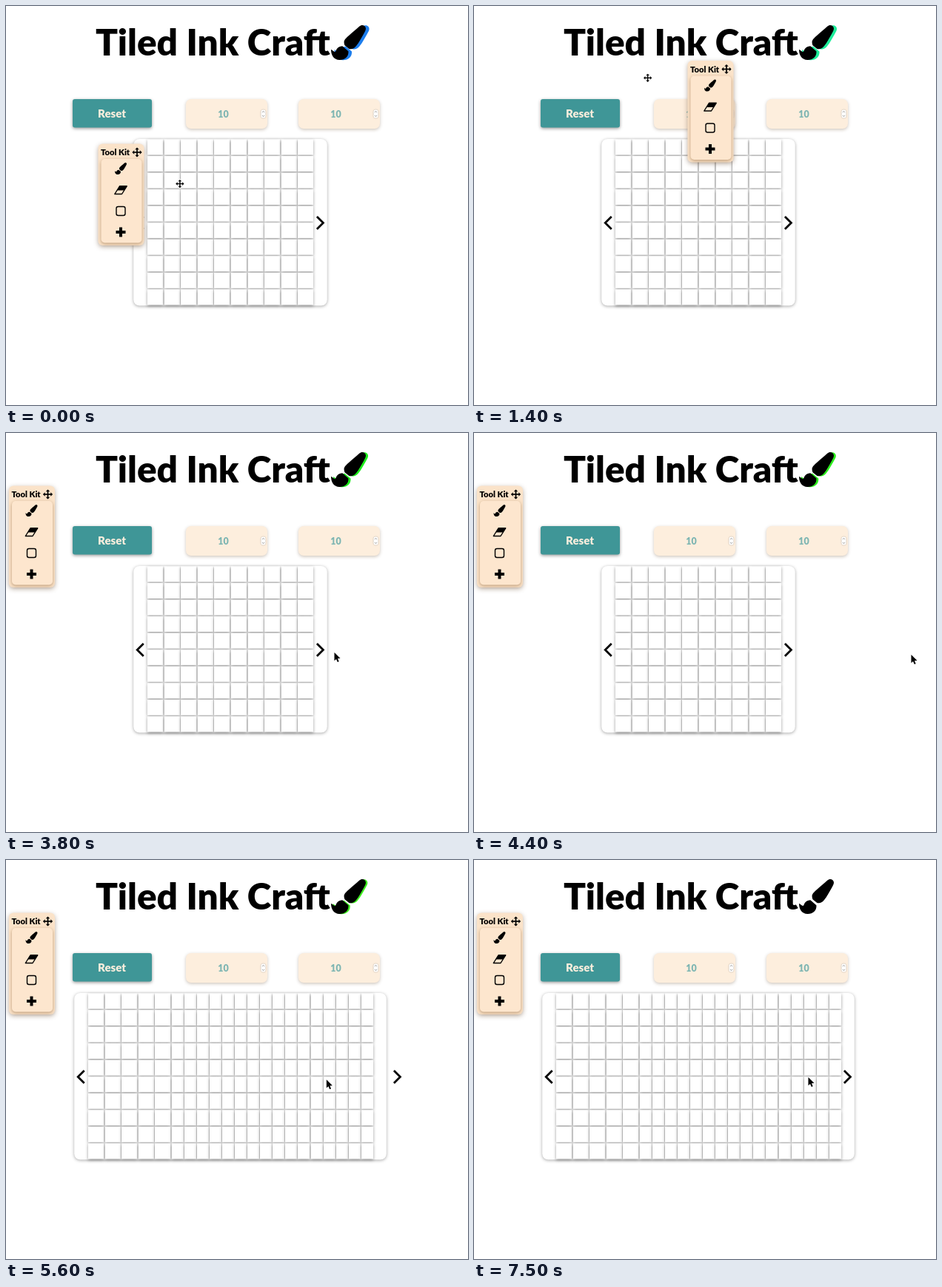
An HTML page with a canvas for the animation above (7.6 s loop, 624 px wide and 540 px high).

```html
<!DOCTYPE html>
<html lang="en">
<head>
<meta charset="utf-8">
<title>Tiled Ink Craft</title>
<style>
html, body { margin: 0; width: 100%; height: 100%; overflow: hidden; background: #fff; }
canvas { display: block; }
</style>
</head>
<body>
<canvas id="stage" width="624" height="540"></canvas>
<script>
const ctx = document.getElementById('stage').getContext('2d');
const LOOP = 7600, STEP = 100;
const GROW = 5000, SETTLE = 5500;
const FONT = 'Lato, "Open Sans", sans-serif';

// key points: time, x, y
const kitPath = [
  [0, 124, 186], [200, 266, 240], [800, 472, 160], [1050, 540, 98],
  [1400, 288, 73.5], [1700, 45, 98], [2000, 5, 142], [2300, 3.5, 71]
];
const pointerPath = [
  [2400, 36, 91], [3200, 430, 300], [3800, 443, 297], [4400, 590, 300],
  [5000, 422, 298], [6000, 438, 297], [6800, 440, 445], [7500, 451, 294]
];

const brush = new Path2D('M167 309c-40 3-77 18-97 73-2 6-8 10-15 10-11 0-45-28-55-35' +
  'C0 440 38 512 128 512c76 0 128-44 128-120 0-3-1-6-1-9zM458 0c-15 0-29 7-40 16' +
  'C213 199 192 203 192 257c0 14 3 27 9 39l64 53c7 2 14 3 22 3 62 0 98-45 211-256' +
  'C505 81 512 66 512 50 512 21 486 0 458 0z');

const clamp = v => Math.max(0, Math.min(1, v));

// Hermite curve through the keys; flow 0 rests at each key, 1 passes through
function glide(keys, t, flow) {
  const last = keys.length - 1;
  t = Math.max(keys[0][0], Math.min(keys[last][0], t));
  const i = Math.max(1, keys.findIndex(k => k[0] >= t));
  const span = keys[i][0] - keys[i - 1][0];
  const k = (t - keys[i - 1][0]) / span;
  const slope = (n, axis) => {
    const a = keys[Math.max(0, n - 1)], b = keys[Math.min(last, n + 1)];
    return flow * span * (b[axis] - a[axis]) / (b[0] - a[0]);
  };
  return [1, 2].map(axis => {
    const from = keys[i - 1][axis], to = keys[i][axis];
    return from + (to - from) * k * k * (3 - 2 * k) +
      slope(i - 1, axis) * k * (1 - k) ** 2 - slope(i, axis) * k * k * (1 - k);
  });
}

function box(x, y, w, h, r, fill, shadow, blur = 4, dy = 1.5) {
  ctx.save();
  ctx.shadowColor = shadow;
  ctx.shadowBlur = blur;
  ctx.shadowOffsetY = dy;
  ctx.fillStyle = fill;
  ctx.beginPath();
  ctx.roundRect(x, y, w, h, r);
  ctx.fill();
  ctx.restore();
}

function poly(points, close) {
  ctx.beginPath();
  points.forEach(([x, y]) => ctx.lineTo(x, y));
  if (close) ctx.closePath();
}

function label(str, x, y, size, color, align = 'center') {
  ctx.font = `900 ${size}px ${FONT}`;
  ctx.textAlign = align;
  ctx.fillStyle = color;
  ctx.fillText(str, x, y);
}

function drawBrush(x, y, size, color) {
  ctx.save();
  ctx.translate(x, y);
  ctx.scale(size / 512, size / 512);
  ctx.fillStyle = color;
  ctx.fill(brush);
  ctx.restore();
}

function drawTitle(t) {
  const str = 'Tiled Ink Craft';
  ctx.font = `900 48px ${FONT}`;
  const size = 48 * 317 / ctx.measureText(str).width;
  label(str, 121, 67, size, '#000', 'left');
  if (t < 5700) {
    const hue = 105 + 107 * Math.exp(-t / 1900);
    drawBrush(443.6 - t * 0.0004, 26.3, 47, `hsl(${hue}, 85%, 52%)`);
  }
  drawBrush(439, 26, 47, '#000');
}

function drawInput(x) {
  box(x, 126, 110, 40, 7, '#fdeedd', 'rgba(90,60,30,.3)');
  label('10', x + 50.5, 150.5, 12.5, '#7db5b2');
  box(x + 101.5, 140.5, 6, 11, 2.5, '#fff', 'rgba(0,0,0,.3)', 2, 0);
  ctx.strokeStyle = '#888';
  ctx.lineWidth = 0.8;
  for (const s of [-1, 1]) {
    const y = 146 + s * 2;
    poly([[x + 103, y], [x + 104.5, y + s * 1.6], [x + 106, y]]);
    ctx.stroke();
  }
}

function chevron(x, dir) {
  ctx.strokeStyle = '#000';
  ctx.lineWidth = 2.8;
  ctx.lineJoin = 'miter';
  poly([[x - dir * 4.5, 285], [x + dir * 4, 293.5], [x - dir * 4.5, 302]]);
  ctx.stroke();
}

// wide columns first, then narrow ones
function columns(t) {
  if (t < GROW) return [10, 0];
  if (t < SETTLE) return [10, 1 + Math.floor((t - GROW) / 40)];
  return [5, 16];
}

function drawGrid(t) {
  const [wide, slim] = columns(t);
  const pitch = 22.55, thin = 17.05;
  const inner = wide * pitch + slim * thin;
  const left = 303 - inner / 2, right = left + inner;
  box(left - 18, 180, inner + 36, 225.5, 8, '#fff', 'rgba(0,0,0,.35)', 4, 1);
  for (let c = 0; c < wide + slim; c++) {
    const x = Math.round(left + Math.min(c, wide) * pitch + Math.max(0, c - wide) * thin);
    const w = c < wide ? pitch : thin;
    for (let r = 0; r < 10; r++) {
      box(x + 1, 180.5 + r * pitch, Math.floor(w) - 1, 21, 0, '#fff', 'rgba(0,0,0,.4)', 4, 1.5);
    }
  }
  // the right arrow trails behind the changing width
  const lag = t < GROW ? 0 : t < SETTLE ? -2.5 : 27 * (1 - clamp((t - SETTLE) / 900));
  chevron(left - 9, -1);
  chevron(right + 8.7 + lag, 1);
}

function moveIcon(x, y, r, width) {
  const h = r * 0.42;
  ctx.lineWidth = width;
  for (const [dx, dy] of [[1, 0], [-1, 0], [0, 1], [0, -1]]) {
    poly([[x, y], [x + dx * (r - 1), y + dy * (r - 1)]]);
    ctx.stroke();
    const bx = x + dx * (r - h), by = y + dy * (r - h);
    poly([[x + dx * r, y + dy * r], [bx + dy * h, by + dx * h], [bx - dy * h, by - dx * h]], true);
    ctx.fill();
  }
}

function drawKit(x, y) {
  ctx.save();
  ctx.translate(x, y);
  box(0.5, 0.5, 62, 137.5, 6, '#fbe3c9', 'rgba(90,60,30,.42)', 6, 2);
  box(4.5, 21, 55, 113.5, 5, '#fde6ce', 'rgba(130,85,40,.5)', 4, 1.5);
  label('Tool Kit', 4, 16, 11.2, '#000', 'left');
  ctx.strokeStyle = ctx.fillStyle = '#000';
  moveIcon(53, 12, 6.6, 1.7);
  drawBrush(23, 26, 16, '#000');

  ctx.lineWidth = 1.4;
  ctx.lineJoin = 'round';
  poly([[22.8, 68.5], [29.5, 57.8], [39.2, 57.8], [32.5, 68.5]], true);
  ctx.stroke();
  poly([[26, 63.5], [29.5, 57.8], [39.2, 57.8], [35.7, 63.5]], true);
  ctx.fill();

  ctx.beginPath();
  ctx.roundRect(25, 85.5, 12, 12, 2.5);
  ctx.stroke();
  ctx.fillRect(24.5, 118, 13, 4);
  ctx.fillRect(29, 113.5, 4, 13);
  ctx.restore();
}

function drawPointer(t) {
  if (t < 2500) {
    // the kit follows the pointer one step late
    const [x, y] = glide(kitPath, t + STEP, 1);
    ctx.strokeStyle = ctx.fillStyle = '#fff';
    moveIcon(x + 33, y + 20, 6.8, 3.4);
    ctx.strokeStyle = ctx.fillStyle = '#000';
    moveIcon(x + 33, y + 20, 5.6, 1.4);
    return;
  }
  ctx.save();
  ctx.translate(...glide(pointerPath, t, 0));
  poly([[0.5, 0], [0.5, 11.2], [3, 8.9], [4.8, 13], [6.7, 12.2], [5, 8.2], [8.5, 8]], true);
  ctx.lineWidth = 1.6;
  ctx.lineJoin = 'round';
  ctx.strokeStyle = '#fff';
  ctx.stroke();
  ctx.fillStyle = '#000';
  ctx.fill();
  ctx.restore();
}

function draw(t) {
  ctx.fillStyle = '#fff';
  ctx.fillRect(0, 0, 624, 540);
  drawTitle(t);
  box(90, 126, 107, 38.5, 3, '#3f9697', 'rgba(0,0,0,.4)');
  label('Reset', 143, 151, 15, '#fbeedd');
  drawInput(243);
  drawInput(395);
  drawGrid(t);
  drawKit(...glide(kitPath, t, 1));
  drawPointer(t);
}

const start = performance.now();
function tick() {
  const t = (performance.now() - start) % LOOP;
  draw(Math.floor(t / STEP) * STEP);
  requestAnimationFrame(tick);
}
tick();
</script>
</body>
</html>
```
